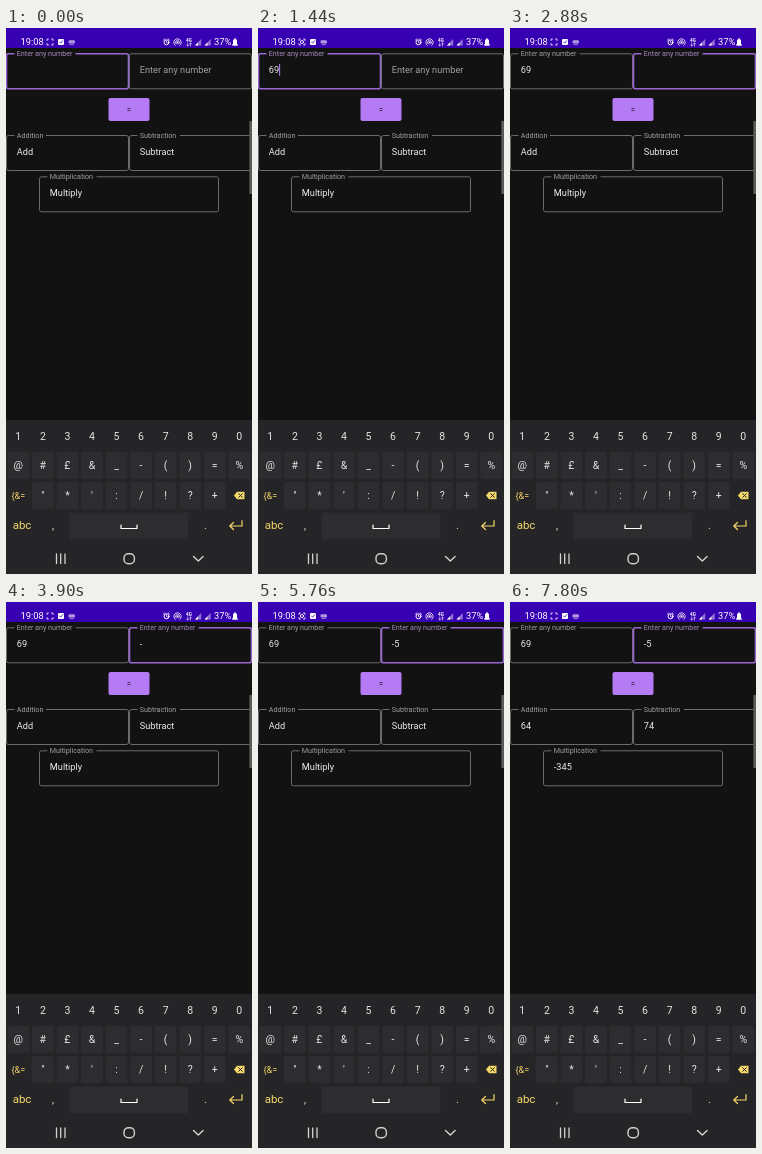
An HTML page that plays this animation: 246 px wide and 546 px high, repeating every 7920 ms.

```html
<!DOCTYPE html>
<html lang="en">
<head>
<meta charset="utf-8">
<title>Calculator form</title>
<style>
  html, body { margin: 0; width: 100%; height: 100%; overflow: hidden; background: #121212; }
  svg { display: block; width: 246px; height: 546px; font-family: Roboto, sans-serif; }
  .key { font-size: 10.5px; fill: #e4e4e6; text-anchor: middle; }
  .accent { fill: #f5d76a; }
  .value { font-size: 9.2px; fill: #ececec; }
  .line { fill: none; stroke: #fff; stroke-linecap: round; stroke-linejoin: round; }
</style>
</head>
<body>
<svg id="stage" viewBox="0 0 246 546"></svg>
<script>
const LOOP = 7920, BLINK = 500;
const BG = '#121212', PURPLE = '#9867d2', GREY = '#777';
const stage = document.getElementById('stage');

// Caret restarts at each of these times: [ms, field]
const carets = [[60, 'a'], [420, 'a'], [960, 'a'], [2280, 'b'], [3360, 'b'], [4860, 'b']];
// Key previews: [from, to, character, key centre x, key centre y]
const presses = [
  [300, 480, '6', 134.5, 408], [840, 960, '9', 208.5, 408],
  [3240, 3420, '-', 135.5, 437.5], [4740, 4920, '5', 110, 408]
];
const typedA = [[0, ''], [420, '6'], [960, '69']];
const typedB = [[0, ''], [3360, '-'], [4860, '-5']];
const FOCUS = 2280, PRESS = 6600, RESULT = 6720;

const rect = (x, y, w, h, fill, r = 0, extra = '') =>
  `<rect x="${x}" y="${y}" width="${w}" height="${h}" rx="${r}" fill="${fill}" ${extra}/>`;
const text = (x, y, s, cls, extra = '') =>
  `<text x="${x}" y="${y}" class="${cls}" ${extra}>${s.replace('&', '&amp;')}</text>`;
const path = (d, width = 1, extra = '') =>
  `<path class="line" d="${d}" stroke-width="${width}" ${extra}/>`;

function field(id, x, y, w, label, gap) {
  const at = x + 10.3;
  return rect(x, y, w, 35, 'none', 2, `id="${id}-box" stroke="${GREY}" stroke-width=".9"`) +
    rect(x + 8, y - 1.5, gap, 3, BG, 0, `id="${id}-gap"`) +
    text(at, y + 2.5, label, '', `id="${id}-label" font-size="7.15" fill="#a0a0a0"`) +
    text(at, y + 19.3, '', 'value', `id="${id}-value"`) +
    rect(at, y + 10, 1, 12, '#bb86fc', 0, `id="${id}-caret"`);
}

function statusBar() {
  const signal = x => `<path d="M${x} 17.5h6.2v-6.5z" fill="#fff" opacity=".45"/>
    <path d="M${x} 17.5h3v-3.1z" fill="#fff"/>`;
  return rect(0, 0, 246, 20, '#3700b3') +
    text(14.5, 17.2, '19:08', '', 'font-size="9.3" fill="#fff"') +
    path('M41 12.5v-1.5h1.5M45.5 11h1.5v1.5M47 15.5v1.5h-1.5M42.5 17h-1.5v-1.5', .8) +
    '<circle id="rec" cx="44" cy="14" r="1.6" class="line" stroke-width=".9"/>' +
    rect(52, 11, 6, 6, '#fff', 1) + path('M53.5 14l1.2 1.2 2-2.5', .8, 'style="stroke:#3700b3"') +
    rect(62.5, 12.2, 6.5, 3.2, '#fff', 1.2, 'opacity=".6"') + path('M64 16.6h3.5', .7, 'opacity=".7"') +
    '<circle class="line" cx="160.5" cy="14.3" r="2.5" stroke-width="1"/>' +
    path('M157.5 12l1.4-1.2M163.5 12l-1.4-1.2M160.5 13v1.5l1 .5', .8) +
    '<circle cx="171.5" cy="14.5" r="1" fill="#fff"/>' +
    path('M169.2 17.4a3.7 3.7 0 1 1 4.6 0M170.2 16a2 2 0 1 1 2.6 0', .8) +
    text(180, 13.8, '4G', '', 'font-size="4.6" font-weight="700" fill="#fff"') +
    path('M181.7 18v-3M180.7 17l1 1 1-1M184.5 15v3M183.5 16l1-1 1 1', .6) +
    signal(189) + signal(198.5) +
    text(208, 17.2, '37%', '', 'font-size="9.3" fill="#fff"') +
    rect(227, 11.5, 4, 6, '#fff', .7) + rect(228, 10.5, 2, 1.2, '#fff') +
    rect(226, 16.2, 6, 1.3, '#fff', .5);
}

function keyboard() {
  const centre = i => 12.3 + i * 24.55;
  const cap = (x, y, w) => rect(x - w / 2, y - 13.5, w, 27, '#2d2d30', 2.5);
  const row = (chars, y, from = 0) => [...chars].map((c, i) =>
    cap(centre(i + from), y, 22) + text(centre(i + from), y + 3.7, c, 'key')).join('');
  const numbers = [...'1234567890'].map((c, i) => text(centre(i), 411.7, c, 'key')).join('');
  return rect(0, 392, 246, 154, '#252527') + numbers +
    row('@#£&_-()=%', 437.5) + row('"*\':/!?+', 467.5, 1) +
    text(12.3, 471, '{&=', 'key accent', 'style="font-size:9px"') +
    '<path d="M228 467.5l3-3.7h7.5v7.4h-7.5z" fill="#f5d76a"/>' +
    path('M232.7 465.7l3.6 3.6M236.3 465.7l-3.6 3.6', 1, 'style="stroke:#252527"') +
    text(16, 501.3, 'abc', 'key accent', 'style="font-size:11.5px"') +
    text(47, 500.5, ',', 'key') + text(199.5, 500.5, '.', 'key') +
    cap(123, 498, 119) + path('M115 497v3.5h16v-3.5', 1.2) +
    path('M236 492.5v5.5h-12M227.5 494.5l-3.7 3.5 3.7 3.5', 1.2, 'style="stroke:#f5d76a"') +
    path('M50.5 526v9.5M54.7 526v9.5M59 526v9.5', 1.3, 'opacity=".8"') +
    rect(118, 525.8, 10.4, 10, 'none', 4.3, 'stroke="#d0d0d0" stroke-width="1.4"') +
    path('M187.5 528.5l4.8 4.6 4.8-4.6', 1.4, 'opacity=".8"');
}

stage.innerHTML = rect(0, 0, 246, 546, BG) + statusBar() +
  field('a', .5, 25.8, 122, 'Enter any number', 61) +
  field('b', 123.5, 25.8, 122, 'Enter any number', 61) +
  '<clipPath id="clip"><rect x="102.5" y="70" width="41" height="23" rx="2"/></clipPath>' +
  rect(102.5, 70, 41, 23, '#b57bf5', 2) +
  '<circle id="ripple" cx="123" cy="81.5" fill="#f0e2ff" clip-path="url(#clip)"/>' +
  text(123, 84.3, '=', '', 'font-size="7" font-weight="500" text-anchor="middle" fill="#1c1226"') +
  field('sum', .5, 107.5, 122, 'Addition', 31.5) +
  field('diff', 123.5, 107.5, 122, 'Subtraction', 42.5) +
  field('prod', 33.5, 148.8, 179, 'Multiplication', 49) +
  rect(243.4, 93, 2.6, 73, '#5c5c5c') + keyboard() +
  `<g id="preview">${rect(-14, -46, 28, 59, '#fde06c', 2.5)}
   <text id="preview-char" y="-23" font-size="14.5" text-anchor="middle" fill="#222"></text></g>`;

const $ = id => document.getElementById(id);
const set = (id, attrs) => { for (const k in attrs) $(id).setAttribute(k, attrs[k]); };
const show = (id, on) => set(id, { visibility: on ? 'visible' : 'hidden' });
const latest = (steps, t) => steps.filter(s => s[0] <= t).pop();
const write = (id, s) => { if ($(id).textContent !== s) $(id).textContent = s; };
const clamp = v => Math.max(0, Math.min(1, v));

function focus(id, on) {
  set(id + '-box', { stroke: on ? PURPLE : GREY, 'stroke-width': on ? 1.6 : .9 });
  set(id + '-label', { fill: on ? '#a48bc0' : '#a0a0a0' });
}

function draw(t) {
  show('rec', Math.floor((t + 60) / 490) % 2);

  write('a-value', latest(typedA, t)[1]);
  write('b-value', latest(typedB, t)[1]);
  focus('a', t < FOCUS + 60);
  focus('b', t >= FOCUS + 60);

  // The second hint floats up to become a label
  const p = clamp((t - FOCUS) / 180), lift = p * p * (3 - 2 * p);
  set('b-label', { y: 45.1 - 16.8 * lift, 'font-size': 9.2 - 2.05 * lift });
  set('b-gap', { width: 61 * lift });

  const caret = latest(carets, t);
  const lit = caret && t < 7800 && Math.floor((t - caret[0]) / BLINK) % 2 === 0;
  for (const id of ['a', 'b']) {
    const on = lit && caret[1] === id;
    show(id + '-caret', on);
    if (on) {
      const s = $(id + '-value');
      const width = s.textContent ? s.getComputedTextLength() : -.3;
      set(id + '-caret', { x: +s.getAttribute('x') + width });
    }
  }

  const press = presses.find(k => t >= k[0] && t < k[1]);
  show('preview', press);
  if (press) {
    set('preview', { transform: `translate(${press[3]} ${press[4]})` });
    write('preview-char', press[2]);
  }

  const age = t - PRESS, active = age >= 0 && age < 420;
  set('ripple', {
    r: active ? 5 + 20 * clamp(age / 225) : 0,
    opacity: active ? .3 * clamp((420 - age) / 200) : 0
  });

  const done = t >= RESULT;
  write('sum-value', done ? String(69 + -5) : 'Add');
  write('diff-value', done ? String(69 - -5) : 'Subtract');
  write('prod-value', done ? String(69 * -5) : 'Multiply');
}

['sum', 'diff', 'prod'].forEach(id => show(id + '-caret', false));
const start = performance.now();
function tick() {
  draw((performance.now() - start) % LOOP);
  requestAnimationFrame(tick);
}
tick();
</script>
</body>
</html>
```
